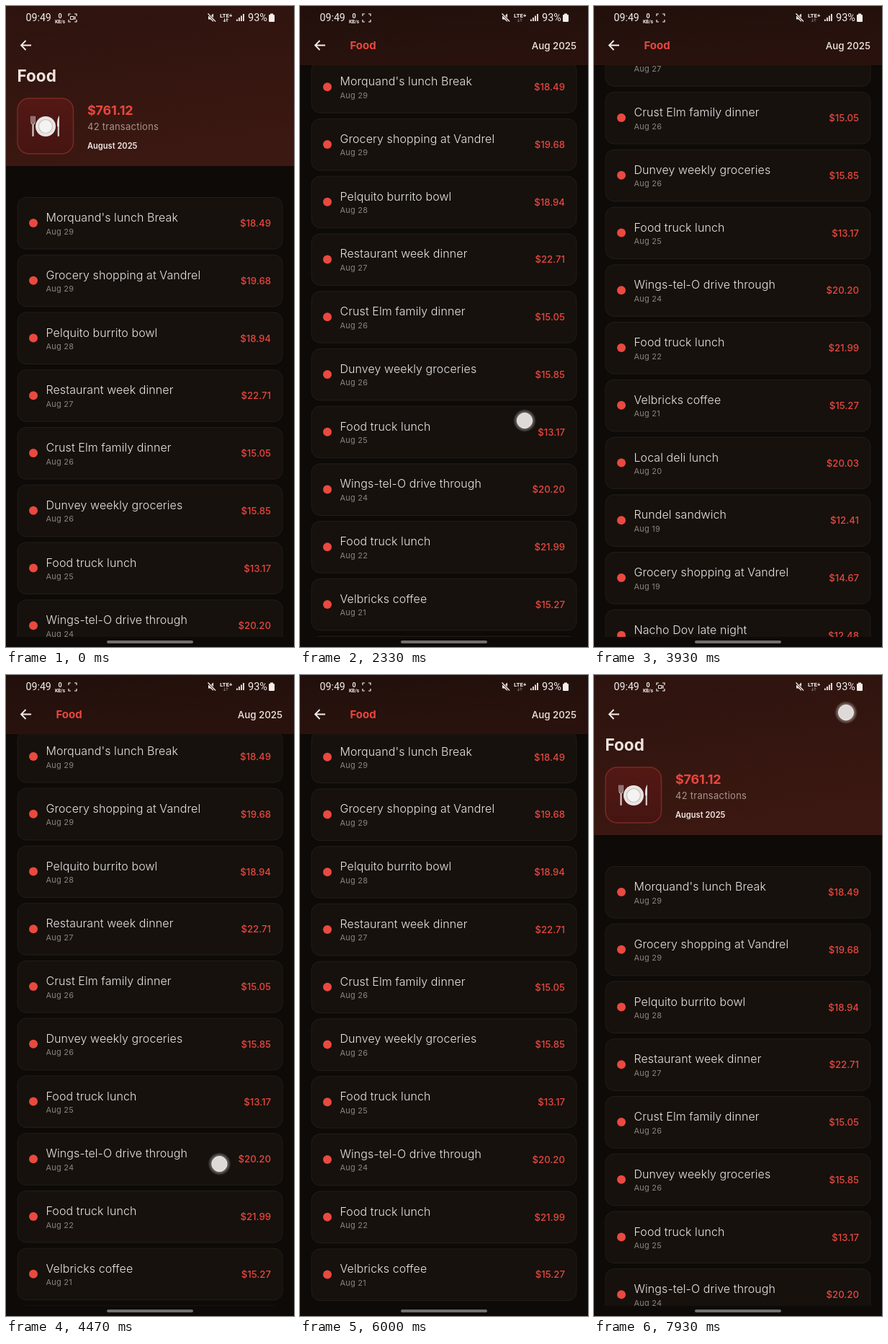
These frames come from a looping animation (400x889 px, 8000 ms). An HTML page:

```html
<!DOCTYPE html>
<html lang="en">
<head>
<meta charset="utf-8">
<title>Food expenses</title>
<style>
  html, body { margin: 0; width: 100%; height: 100%; overflow: hidden; background: #0d0a07; }
  svg { display: block; width: 100%; height: 100%; font-family: Inter, "Open Sans", sans-serif; }
  .status { font-family: Roboto, sans-serif; fill: #f4eeeb; }
  .name { font-size: 16px; letter-spacing: .08px; fill: #e9e5e2; font-weight: 350; }
  .date { font-size: 11px; letter-spacing: .2px; fill: #8a8480; }
  .sum { font-size: 13.2px; font-weight: 500; fill: #e9473f; text-anchor: end; }
</style>
</head>
<body>
<svg viewBox="0 0 400 889">
  <defs>
    <linearGradient id="head" x1="0" y1="0" x2=".25" y2="1">
      <stop offset="0" stop-color="#2d130e"/>
      <stop offset="1" stop-color="#3b1811"/>
    </linearGradient>
    <linearGradient id="tile" x1="0" y1="0" x2="0" y2="1">
      <stop offset="0" stop-color="#531814"/>
      <stop offset="1" stop-color="#451512"/>
    </linearGradient>
    <radialGradient id="glow">
      <stop offset=".6" stop-color="#fff" stop-opacity=".5"/>
      <stop offset="1" stop-color="#fff" stop-opacity="0"/>
    </radialGradient>
  </defs>
  <rect width="400" height="889" fill="#0d0a07"/>
  <g id="page">
    <g id="list"></g>
    <rect id="bar" width="400" height="222" fill="url(#head)"/>
    <rect id="shade" width="400" height="222" fill="#100c09"/>
    <text id="big" x="15.5" y="105" font-size="22.5" font-weight="700" fill="#eee4df">Food</text>
    <g id="info">
      <rect x="16" y="128" width="77.500" height="77" rx="16" fill="url(#tile)" stroke="#7b2925" stroke-width="1.5"/>
      <g fill="none" stroke="#d4d0cf" stroke-linecap="round">
        <path d="M37.500 165V180" stroke-width="2.200"/>
        <path d="M35 153v7q0 4 2.500 4t2.500-4v-7M37.500 153v9" stroke-width="1.200"/>
        <path d="M72.800 167V180" stroke-width="2.200"/>
      </g>
      <path d="M74 152q-3.500 4-3 15h3z" fill="#dedbd9"/>
      <circle cx="55" cy="167" r="14" fill="#e8e5e3"/>
      <circle cx="55" cy="167" r="9.500" fill="#f5f3f1" stroke="#c6c1be" stroke-width="1.200"/>
      <text x="113" y="150.500" font-size="18" font-weight="700" letter-spacing="-.2" fill="#e9473f">$761.12</text>
      <text x="113" y="172" font-size="13" letter-spacing=".25" fill="#a8938d">42 transactions</text>
      <text x="113" y="197.500" font-size="11.100" font-weight="600" fill="#f0e8e4">August 2025</text>
    </g>
    <path d="M35 54.500H21M27.500 48L21 54.500L27.500 61" fill="none" stroke="#f4eeeb" stroke-width="1.800"/>
    <g id="small">
      <text x="69.500" y="60" font-size="15" font-weight="700" fill="#e9473f">Food</text>
      <text x="384" y="60" font-size="13.300" font-weight="500" text-anchor="end" fill="#f0e8e4">Aug 2025</text>
    </g>
  </g>
  <rect y="875" width="400" height="14" fill="#0d0a07"/>
  <rect x="140" y="880" width="120" height="4" rx="2" fill="#737170"/>
  <g class="status">
    <text x="27.500" y="21" font-size="14.200">09:49</text>
    <text x="75" y="17" font-size="9" font-weight="700" text-anchor="middle">0</text>
    <text x="75" y="24" font-size="6.500" font-weight="700" text-anchor="middle">KB/s</text>
    <path d="M87 14v-3h3M95 11h3v3M98 19v3h-3M90 22h-3v-3" fill="none" stroke="#f4eeeb" stroke-width="1.200"/>
    <path id="cam" d="M89.500 14.500h4.500v4h-4.500zM94 16l2.200-1.200v3.600l-2.200-1.200" fill="none" stroke="#f4eeeb"/>
    <path d="M281 14h3l4-3.500v11.500l-4-3.500h-3z"/>
    <path d="M280.500 10.500l10.500 11" stroke="#2d130e" stroke-width="3"/>
    <path d="M280.500 10.500l10.500 11" stroke="#f4eeeb" stroke-width="1.300"/>
    <text x="297" y="16" font-size="8" font-weight="700">LTE+</text>
    <path id="net" d="M303.500 17.500v4.500m-1.700-1.700l1.700 1.700l1.700-1.700M307 22v-4.500m-1.700 1.700l1.700-1.700l1.700 1.700" fill="none" stroke="#f4eeeb"/>
    <path d="M320 18.500h1.800V21H320zM323 16h1.800v5H323zM326 13.500h1.800V21H326zM329 11h1.800v10H329z"/>
    <text x="336" y="21" font-size="14.500">93%</text>
    <path d="M367 10.500h4v1.500h1q1 0 1 1v8q0 1-1 1h-6q-1 0-1-1v-8q0-1 1-1h1z"/>
  </g>
  <g id="touch">
    <circle r="16" fill="url(#glow)"/>
    <circle r="10.500" fill="#dddad7" stroke="#f1efed" stroke-width="1"/>
  </g>
</svg>
<script>
const LOOP = 8000, PITCH = 79.75;
const $ = id => document.getElementById(id);
const set = (id, attrs) => { for (const k in attrs) $(id).setAttribute(k, attrs[k]); };
const clamp = v => Math.max(0, Math.min(1, v));

const rows = `Morquand's lunch Break|29|18.49
Grocery shopping at Vandrel|29|19.68
Pelquito burrito bowl|28|18.94
Restaurant week dinner|27|22.71
Crust Elm family dinner|26|15.05
Dunvey weekly groceries|26|15.85
Food truck lunch|25|13.17
Wings-tel-O drive through|24|20.20
Food truck lunch|22|21.99
Velbricks coffee|21|15.27
Local deli lunch|20|20.03
Rundel sandwich|19|12.41
Grocery shopping at Vandrel|19|14.67
Nacho Dov late night|19|12.48
Crust Elm family dinner|18|19.97
Dunvey weekly groceries|18|19.82
Morquand's lunch break|18|24.45`;

$('list').innerHTML = rows.split('\n').map((row, i) => {
  const [name, day, sum] = row.split('|');
  return `<g transform="translate(0 ${265 + i * PITCH})">
    <rect x="16" y=".5" width="368" height="71.5" rx="12" fill="#16110d" stroke="#231d19"/>
    <circle cx="38" cy="36" r="6" fill="#ea4940"/>
    <text class="name" x="55.5" y="34">${name}</text>
    <text class="date" x="55.5" y="51.5">Aug ${day}</text>
    <text class="sum" x="368" y="41">$${sum}</text></g>`;
}).join('');

// Keys are [time, value, 1 if the move decays like a fling].
const scrollKeys = [
  [1200, 0], [1500, 110], [2050, 188, 1], [2330, 188], [2500, 330], [2800, 460, 1],
  [3030, 460], [3200, 610], [3500, 721, 1], [3570, 721], [3760, 600], [4130, 440, 1],
  [4230, 440], [4450, 188], [4700, 188], [4980, 0], [5600, 0], [5850, 140],
  [6050, 188, 1], [6150, 188], [6280, 260], [6670, 321, 1], [6870, 321], [7030, 188],
  [7400, 0, 1]
];
const stretchKeys = [[4980, 0], [5090, .0175], [5130, .0168], [5530, 0, 1]];
const titleKeys = [[1300, 1], [1550, 0], [4860, 0], [5170, 1], [5650, 1], [5850, 0], [7080, 0], [7350, 1]];

// Start, end, then the finger's path.
const touches = [
  [1130, 1500, 316, 690, 314, 560], [2240, 2500, 312, 575, 316, 440],
  [3000, 3200, 312, 600, 318, 450], [3530, 3760, 302, 540, 300, 660],
  [4190, 4490, 300, 450, 296, 702], [4670, 5080, 290, 480, 294, 706],
  [5570, 5850, 308, 650, 312, 510], [6120, 6280, 312, 590, 316, 515],
  [6830, 7030, 312, 440, 308, 575], [7870, 8000, 350, 52, 350, 52]
];

function track(keys, t) {
  const i = keys.findIndex(k => k[0] > t);
  if (i < 0) return keys[keys.length - 1][1];
  if (!i) return keys[0][1];
  const [t0, a] = keys[i - 1], [t1, b, fling] = keys[i];
  const u = (t - t0) / (t1 - t0);
  return a + (b - a) * (fling ? 1 - (1 - u) ** 3 : u);
}

function drawTouch(t) {
  const hit = touches.find(([a, b]) => t >= a && t < b + 110);
  if (!hit) return set('touch', { opacity: 0 });
  const [a, b, x0, y0, x1, y1] = hit;
  const hold = Math.min(100, (b - a) / 2);
  const u = clamp((t - a - hold) / (b - a - hold));
  set('touch', {
    transform: `translate(${x0 + (x1 - x0) * u} ${y0 + (y1 - y0) * u})`,
    opacity: Math.min(clamp((t - a) / 50), clamp(1 - (t - b) / 110))
  });
}

function draw(t) {
  const scroll = track(scrollKeys, t);
  const title = track(titleKeys, t);
  const fold = clamp(scroll / 140);
  const height = 222 - 140 * fold;
  const shift = `translate(0 ${-scroll})`;
  set('page', { transform: `scale(1 ${1 + track(stretchKeys, t)})` });
  set('list', { transform: shift });
  set('bar', { height });
  set('shade', { height, opacity: .4 * fold });
  set('big', { transform: shift, opacity: title * clamp(1 - scroll / 60) });
  set('info', { transform: shift, opacity: clamp(1.3 - scroll / 85) });
  set('small', { opacity: clamp((scroll - 90) / 50) * (1 - title) });
  set('cam', { opacity: t < 1130 || t >= 7400 ? 1 : 0 });
  const busy = t < 600 || (t >= 3000 && t < 3870) || (t >= 6400 && t < 7600);
  set('net', { opacity: busy ? 1 : .35 });
  drawTouch(t);
}

const start = performance.now();
function tick() {
  draw((performance.now() - start) % LOOP);
  requestAnimationFrame(tick);
}
tick();
</script>
</body>
</html>
```
